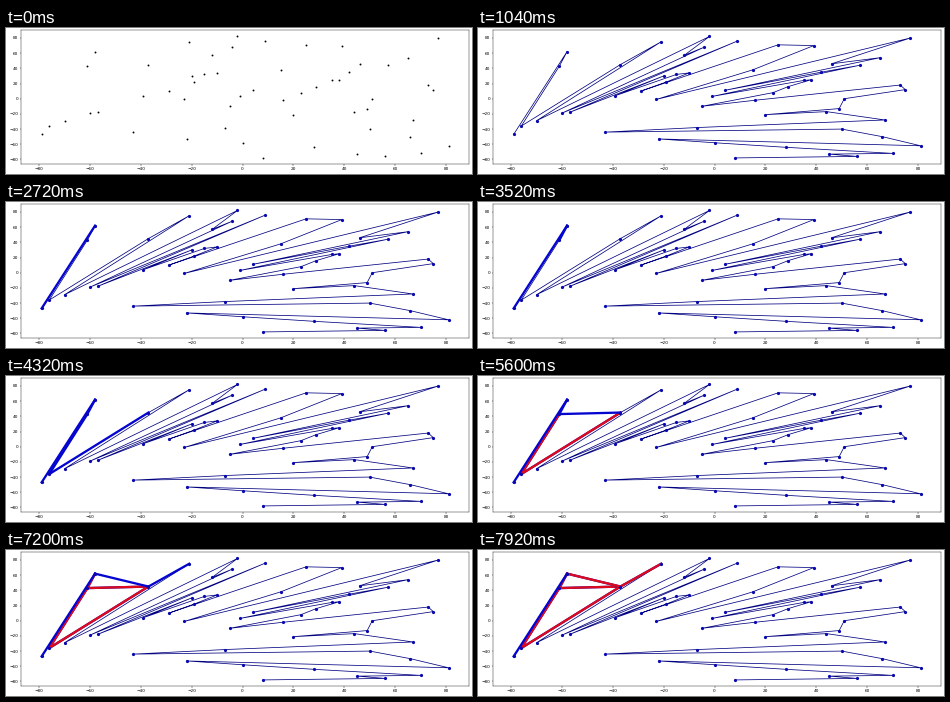
These frames come from a looping animation (466 px wide and 146 px high, 8 s). A matplotlib script:

```python
import numpy as np
import matplotlib.pyplot as plt
from matplotlib.animation import FuncAnimation

W, H, DPI = 466, 146, 100
FRAMES, STEP_MS = 100, 80
PX = 72 / DPI  # points per pixel
LEFT, RIGHT, TOP, BOTTOM = 15.3, 462.9, 2.4, 136.0
NAVY, DOT, BLUE, RED = "#000080", "#0808b0", "#0505d0", "#dc0a1c"
PATH_AT, HULL_AT, SCAN_AT, SCAN_GAP = 160, 2720, 3520, 400

# The irregular point set the scan runs on; everything else is derived from it.
POINTS = [
    (-79, -47), (-76, -36), (-70, -29), (-61, 43), (-58, 62), (-60, -19),
    (-57, -18), (-43, -44), (-39, 4), (-37, 45), (-29, 10), (-23, -1),
    (-22, -53), (-21, 75), (-20, 30), (-19, 22), (-15, 32), (-12, 57),
    (-10, 34), (-7, -38), (-5, -10), (-4, 68), (-2, 82), (-1, 3), (0, -58),
    (4, 11), (8, -78), (9, 76), (15, 38), (16, -2), (20, -21), (23, 8),
    (25, 71), (28, -64), (29, 16), (35, 24), (38, 25), (39, 70), (42, 35),
    (44, -17), (45, -73), (46, 46), (49, -13), (50, -40), (51, 0),
    (56, -76), (57, 44), (65, 54), (66, -50), (67, -28), (70, -72),
    (73, 18), (75, 12), (77, 80), (81, -62),
]


def sort_by_angle(points):
    """Leftmost point first, the rest clockwise around it."""
    x0, y0 = first = min(points)
    rest = [p for p in points if p != first]
    rest.sort(key=lambda p: -np.arctan2(p[1] - y0, p[0] - x0))
    return np.array([first] + rest, float)


def turns_left(a, b, c):
    return (b[0] - a[0]) * (c[1] - b[1]) - (b[1] - a[1]) * (c[0] - b[0]) > 0


def graham_steps(path):
    """Edges in drawing order: (i, j, colour)."""
    stack = [0, 1]
    yield 0, 1, BLUE
    for k in range(2, len(path)):
        yield stack[-1], k, BLUE
        while len(stack) > 1 and turns_left(path[stack[-2]], path[stack[-1]], path[k]):
            top = stack.pop()
            yield top, k, RED
            yield stack[-1], top, RED
            yield stack[-1], k, BLUE
        stack.append(k)


def start_time(n):
    return HULL_AT if n == 0 else SCAN_AT + (n - 1) * SCAN_GAP


def make_axes(fig, points):
    ax = fig.add_axes([LEFT / W, 1 - BOTTOM / H, (RIGHT - LEFT) / W, (BOTTOM - TOP) / H])
    (x0, y0), (x1, y1) = points.min(0) - 8, points.max(0) + 8
    ax.set(xlim=(x0, x1), ylim=(y0, y1))
    ticks = range(-80, 81, 20)
    ax.set_xticks(ticks)
    ax.set_yticks(ticks)
    ax.tick_params(labelsize=4.3 * PX, length=1.5 * PX, width=0.4 * PX,
                   pad=1.5 * PX, labelfontfamily="DejaVu Sans")
    for spine in ax.spines.values():
        spine.set_linewidth(0.4 * PX)
    return ax


path = sort_by_angle(POINTS)
fig = plt.figure(figsize=(W / DPI, H / DPI), dpi=DPI, facecolor="white")
ax = make_axes(fig, path)


def plot(points, style, color, size, z):
    return ax.plot(*points.T, style, color=color, lw=size * PX,
                   ms=size * PX, mew=0, zorder=z)[0]


dots = plot(path, "o", "black", 1.9, 6)
tour = plot(path, "-", NAVY, 0.75, 2)
tour_dots = plot(path, "o", DOT, 3.2, 5)

edges = []
for n, (i, j, color) in enumerate(graham_steps(path)):
    if start_time(n) >= FRAMES * STEP_MS:
        break
    edges.append((start_time(n), plot(path[[i, j]], "-", color, 2.3, 4 if n == 0 else 3)))


def draw(frame):
    t = frame * STEP_MS
    dots.set_visible(t < PATH_AT)
    for artist in (tour, tour_dots):
        artist.set_visible(t >= PATH_AT)
    for start, line in edges:
        line.set_visible(t >= start)
    return [dots, tour, tour_dots] + [line for _, line in edges]


anim = FuncAnimation(fig, draw, frames=FRAMES, interval=STEP_MS,
                     repeat=True, repeat_delay=0, blit=False)
plt.show()
```
